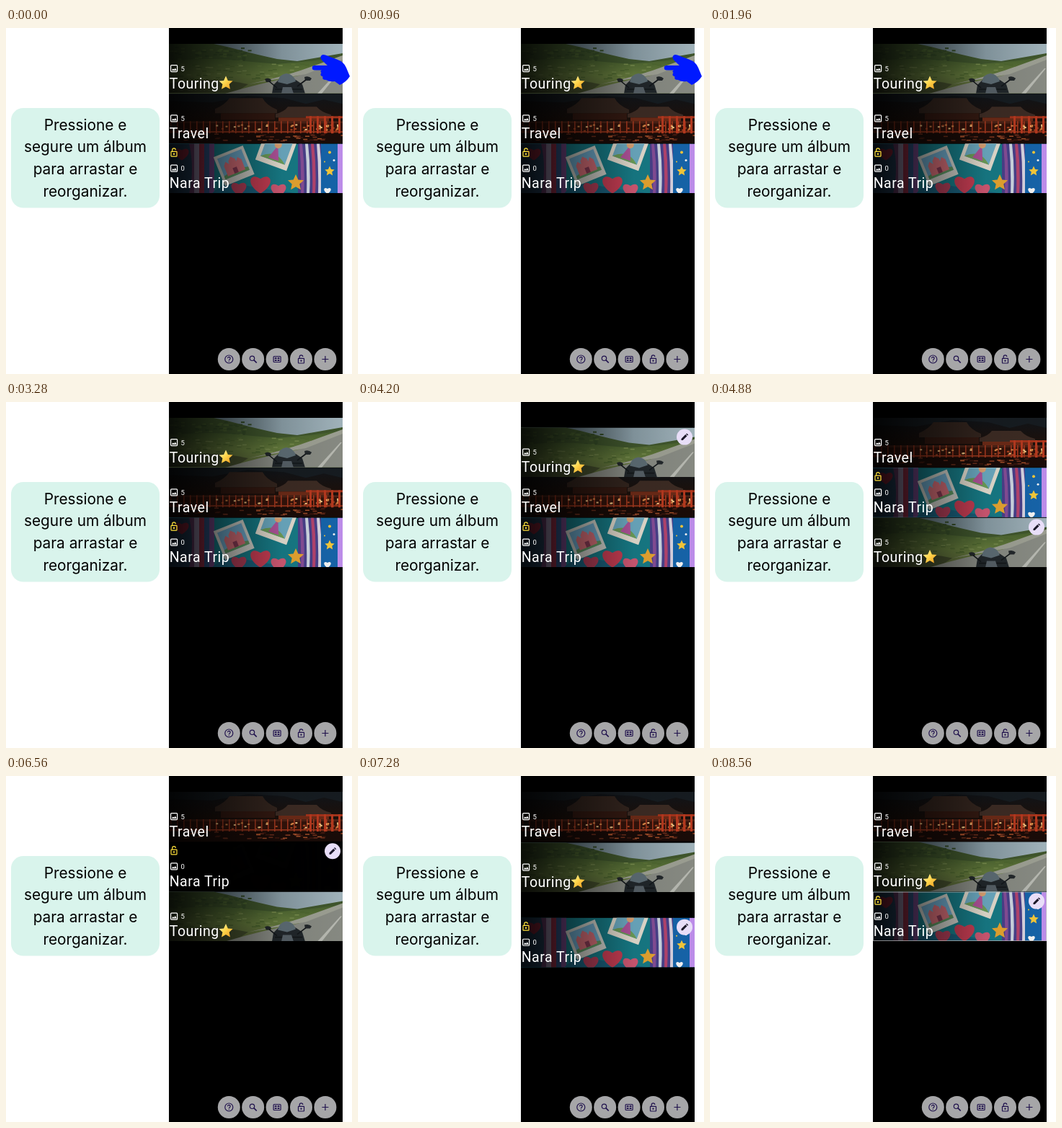
An HTML page that plays this animation: 480 px wide and 480 px high, repeating every 9040 ms.

```html
<!DOCTYPE html>
<html lang="pt">
<head>
<meta charset="utf-8">
<style>
  html, body { margin: 0; width: 100%; height: 100%; overflow: hidden; background: #fff; }
  svg { display: block; width: 100%; height: 100%; }
  .caption { font: 20.8px Inter, sans-serif; text-anchor: middle; }
  .title { font: 19.5px Roboto, sans-serif; letter-spacing: .5px; fill: #fff; }
  .count { font: 9.5px Roboto, sans-serif; fill: #fff; }
  .line { fill: none; stroke: currentColor; stroke-width: 1.2; }
</style>
</head>
<body>
<svg viewBox="0 0 480 480">
  <defs>
    <clipPath id="card"><rect width="241" height="68.5"/></clipPath>
    <linearGradient id="shade">
      <stop offset="0" stop-opacity=".85"/><stop offset=".25" stop-opacity=".55"/><stop offset=".65" stop-opacity=".1"/><stop offset="1" stop-opacity=".05"/>
    </linearGradient>
    <linearGradient id="sky"><stop offset=".3" stop-color="#70858f"/><stop offset="1" stop-color="#a9bcc4"/></linearGradient>
    <linearGradient id="grass" x2="0" y2="1"><stop stop-color="#48622f"/><stop offset=".5" stop-color="#69803f"/><stop offset="1" stop-color="#5d683c"/></linearGradient>
    <linearGradient id="night" x2="0" y2="1"><stop stop-color="#10151a"/><stop offset=".5" stop-color="#1d110c"/><stop offset="1" stop-color="#140a07"/></linearGradient>
    <linearGradient id="gold" x2="1" y2="1"><stop stop-color="#fff7c0"/><stop offset=".45" stop-color="#ffd84e"/><stop offset="1" stop-color="#f0961c"/></linearGradient>
    <path id="star" d="M0-10 2.9-3.6 9.6-3 4.6 1.6 6 8.3 0 4.9-6 8.3-4.6 1.6-9.6-3-2.9-3.6Z"/>
    <path id="heart" d="M0 9C-16-1-9-12 0-5 9-12 16-1 0 9Z"/>
    <g id="lock" class="line"><rect x="-4" y="-1.200" width="8" height="6.700" rx=".5"/><path d="M-2.300-1.200V-3.400a2.300 2.300 0 0 1 4.600 0"/><circle cy="2.100" r=".6"/></g>
  </defs>

  <rect x="7" y="111" width="206" height="138.5" rx="17" fill="#d9f4ec"/>
  <g class="caption">
    <text x="110" y="141.5">Pressione e</text>
    <text x="110" y="172.3">segure um álbum</text>
    <text x="110" y="203.1">para arrastar e</text>
    <text x="110" y="233.9">reorganizar.</text>
  </g>

  <rect x="226" width="241" height="480"/>
  <g id="rows"></g>
  <g id="buttons" color="#20124d"></g>
  <path id="hand" fill="#0019ff" d="M428 52H446C441 47 436 44 436.500 40Q438 35.500 443 37.500L459 43.500Q469 47 472 55L477 67Q472 75 463 79L456 74Q449 75 444 72Q438 72 439.500 67.500Q434.500 66 437.500 62Q435 60 438 58.500L428 58.500A3.250 3.250 0 0 1 428 52Z"/>
</svg>
<script>
const $ = id => document.getElementById(id);
const repeat = (n, draw) => Array.from({ length: n }, (_, i) => draw(i)).join('');
const rect = (x, y, w, h, fill) => `<rect x="${x}" y="${y}" width="${w}" height="${h}" fill="${fill}"/>`;
const path = (d, fill) => `<path d="${d}" fill="${fill}"/>`;
const use = (id, x, y, s, fill) => `<use href="#${id}" transform="translate(${x} ${y}) scale(${s})" fill="${fill}"/>`;

let seed = 7;
const random = () => (seed = seed * 16807 % 2147483647) / 2147483647;
const speckle = (n, x, y, w, h, sw, sh, colors) => repeat(n, i =>
  rect((x + random() * w).toFixed(1), (y + random() * h).toFixed(1), sw, sh, colors[i % colors.length]));

const scenes = {
  touring: rect(0, 0, 241, 69, 'url(#sky)') +
    path('M0 0H62Q82 4 100 9T150 21L178 24 241 13V69H0Z', '#42592e') +
    speckle(60, 0, 4, 110, 20, 5, 2, ['#38502a', '#506a33']) +
    path('M0 24Q60 18 105 24L150 28 195 24 241 18V69H0Z', 'url(#grass)') +
    speckle(90, 0, 27, 190, 22, 6, 1.5, ['#506a31', '#7c9150', '#60783a']) +
    path('M0 55Q55 44 110 56L90 69H0Z', '#46502e') +
    path('M78 69Q125 55 180 44L241 19V69Z', '#8d9088') +
    path('M110 56Q160 46 205 29L241 16V22L190 42Z', '#a3a699') +
    path('M206 69 238 34 240 34 212 69Z', '#bfc1b9') +
    path('M143 69 145 57 153 49 164 47 176 50 185 56 189 69Z', '#22282c') +
    path('M151 53Q153 42 163 41 173 42 176 52L164 56Z', '#607078') +
    path('M133 49Q138 46 142 50L141 53H135ZM188 46Q194 44 198 48L196 51H189Z', '#24292c') +
    '<path d="M139 52 150 61M190 50 178 59M147 63H185" stroke="#14181b" stroke-width="1.600"/>' +
    path('M158 60H170L173 69H156Z', '#59636a'),

  travel: rect(0, 0, 241, 69, 'url(#night)') +
    path('M0 0H241V14L215 8 190 14 160 6 110 3 60 12 0 10Z', '#171d22') +
    path('M64 21Q78 15 84 6H130Q135 16 150 22V27H64Z', '#35261f') +
    path('M148 28Q160 25 165 18H205Q212 26 225 29V33H148Z', '#3f2d25') +
    rect(72, 27, 75, 9, '#351a12') + rect(152, 33, 70, 9, '#702c18') +
    rect(0, 38, 241, 3, '#4e2417') + rect(0, 41, 241, 14, '#35140b') +
    repeat(28, i => rect(i * 9 + 2, 38, 1.6, 17, '#a83a20')) +
    speckle(45, 65, 42, 176, 9, 3, 2, ['#e08b48', '#ad4622', '#ffd08a']) +
    rect(0, 52, 241, 1.5, '#a83c20') +
    rect(190, 31, 51, 3, '#a9351c') +
    repeat(5, i => rect(195 + i * 10, 31, 3, 28, '#bd3b20')) +
    rect(0, 55, 241, 14, '#1b0c08') +
    speckle(50, 20, 55, 220, 10, 6, 1.5, ['#70301d', '#431a10', '#a8512b']),

  nara: rect(0, 0, 241, 69, '#18808c') +
    repeat(5, i => rect(28 + i * 7, 0, 7, 69, ['#70406f', '#9c8eae', '#982f49', '#305182', '#754a8a'][i])) +
    path('M0 0H28Q36 35 28 69H0Z', '#284765') +
    use('heart', 18, 14, 1, '#a52a42') +
    rect(179, 0, 33, 69, '#4c4390') +
    repeat(4, i => path(`M${181 + i * 8} 0h4q4 35 2 69h-4q1-35-2-69Z`, ['#8b519d', '#d7dfeb', '#bb4772', '#e1dce9'][i])) +
    rect(211, 0, 24, 69, '#1768b0') + rect(234, 0, 7, 69, '#c694f5') +
    path('M60 69Q75 51 102 57T180 69Z', '#1b6481') +
    '<g transform="translate(90 30) rotate(-22)">' + rect(-22, -21, 44, 43, '#d9dad2') + rect(-18, -17, 36, 31, '#72b0d2') +
      path('M-18 14V9Q0 3 18 9V14Z', '#659d65') + path('M-13 11V-4L-9-9-5-4V-8L0-13 5-8V-4L9-9 13-4V11Z', '#df737d') + rect(-3, 3, 6, 8, '#8e3d58') + '</g>' +
    '<g transform="translate(149 9) rotate(20)">' + rect(-23, -23, 46, 45, '#ede6d8') + rect(-18, -20, 36, 35, '#70b1c9') +
      path('M-18 15Q0-2 18 15Z', '#72a45b') + path('M-7 13 0-7 8 13Z', '#b756a0') + '<circle cy="-8" r="5" fill="#e5a877"/></g>' +
    use('heart', 97, 62, 1.1, '#b8405b') + use('heart', 127, 56, 1.45, '#d04057') + use('heart', 152, 64, 1.1, '#d95c78') +
    use('star', 176, 54, 1.15, '#f1ac32') + use('star', 223, 38, .7, '#ffd03c') +
    '<circle cx="223" cy="12" r="2" fill="#ffd03c"/><circle cx="229" cy="23" r="1.500" fill="#fff"/><circle cx="216" cy="25" r="1" fill="#ffd03c"/>' +
    use('heart', 220, 65, .5, '#fff')
};

const pencil = `<g class="pencil"><rect x=".5" y=".5" width="240" height="67.500" fill="none" stroke="#bbb" stroke-width=".7" class="edge"/>
  <circle cx="227" cy="13" r="11" fill="#e8def8"/>
  <path d="M222.500 17.500v-2.200l5.800-5.800 2.200 2.200-5.800 5.800ZM229 8.800l1-1 2.200 2.200-1 1Z" fill="#1d192b"/></g>`;

function addRow(name, title, count, extra = '') {
  $('rows').insertAdjacentHTML('beforeend', `<g id="${name}">
    <g class="photo" clip-path="url(#card)">${scenes[name]}${rect(0, 0, 241, 69, 'url(#shade)')}</g>
    <g color="#fff"><rect class="line" x="2.600" y="29.600" width="9" height="9" rx="1"/>
    <path d="M3.800 37 5.800 34.300 7.200 36 8.800 33.500 10.800 37Z" fill="#fff"/></g>
    <text class="count" x="16.500" y="37.500">${count}</text>
    <text class="title" x=".7" y="61.500">${title}</text>${extra}${pencil}</g>`);
  const node = $(name);
  return { node, photo: node.querySelector('.photo'), pencil: node.querySelector('.pencil'), edge: node.querySelector('.edge') };
}
const travel = addRow('travel', 'Travel', 5);
const nara = addRow('nara', 'Nara Trip', 0, '<use href="#lock" x="7" y="12" color="#ffe03a"/>');
const touring = addRow('touring', 'Touring', 5, use('star', 79, 54.5, 1, 'url(#gold)'));

const icons = [
  '<circle class="line" r="5.500"/><path class="line" d="M-1.800-1.300a1.800 1.800 0 1 1 2.800 1.500Q0 .9 0 1.700M0 2.700V3.800"/>',
  '<circle class="line" cx="-1.200" cy="-1.200" r="3.200"/><path class="line" d="M1.200 1.200 5 5" style="stroke-width:1.700"/>',
  '<rect class="line" x="-5" y="-4" width="10" height="8" rx="1"/><path d="M-3.300-2.400h2.700v2h-2.700ZM.6-2.400h2.700v2H.6ZM-3.300.6h2.700v2h-2.700ZM.6.6h2.700v2H.6Z"/>',
  '<use href="#lock"/>',
  '<path class="line" d="M-4.500 0h9M0-4.500v9"/>'
];
$('buttons').innerHTML = icons.map((icon, i) =>
  `<g transform="translate(${309.3 + i * 33.4} 459.500)" fill="#20124d"><circle r="15.500" fill="#a6a6a8"/>${icon}</g>`).join('');

const LOOP = 9040, PITCH = 69.3;
const ramp = (t, a, b) => Math.min(1, Math.max(0, (t - a) / (b - a)));
const smooth = (t, a, b) => { const p = ramp(t, a, b); return p * p * (3 - 2 * p); };

function place(row, slot, held, opacity = 1, edge = false) {
  row.node.setAttribute('transform', `translate(226 ${22 + slot * PITCH})`);
  row.photo.setAttribute('opacity', opacity);
  row.pencil.setAttribute('display', held ? 'inline' : 'none');
  row.edge.setAttribute('display', edge ? 'inline' : 'none');
}

function frame() {
  const t = performance.now() % LOOP;

  // Two quick pulses of the pointing hand.
  const scale = 1.1 - .1 * Math.cos(4 * Math.PI * ramp(t, 480, 1440));
  $('hand').setAttribute('transform', `translate(450.500 57.500) scale(${scale}) translate(-450.500 -57.500)`);
  $('hand').setAttribute('display', t < 1960 ? 'inline' : 'none');

  // Photos reload when a card is picked up or dropped; drags overshoot a little.
  const touringFade = t < 3760 ? 1 : t < 5040 ? ramp(t, 3760, 4000) : ramp(t, 5040, 5400);
  const naraFade = t < 6560 ? 1 : ramp(t, 6560, 6800);
  const touringDrag = 2.2 * smooth(t, 4120, 4560) - .2 * smooth(t, 4600, 4880);
  const naraDrag = 1.52 * smooth(t, 6960, 7280) - .52 * smooth(t, 7280, 7680);
  place(travel, 1 - smooth(t, 4260, 4510), false);
  place(touring, touringDrag - smooth(t, 7050, 7300), t >= 3760 && t < 5040, touringFade);
  place(nara, 2 - smooth(t, 4400, 4650) + naraDrag, t >= 6560, naraFade, t >= 7680);

  const top = t < 6560 ? touring.node : nara.node;
  if ($('rows').lastElementChild !== top) $('rows').append(top);
  requestAnimationFrame(frame);
}
frame();
</script>
</body>
</html>
```
